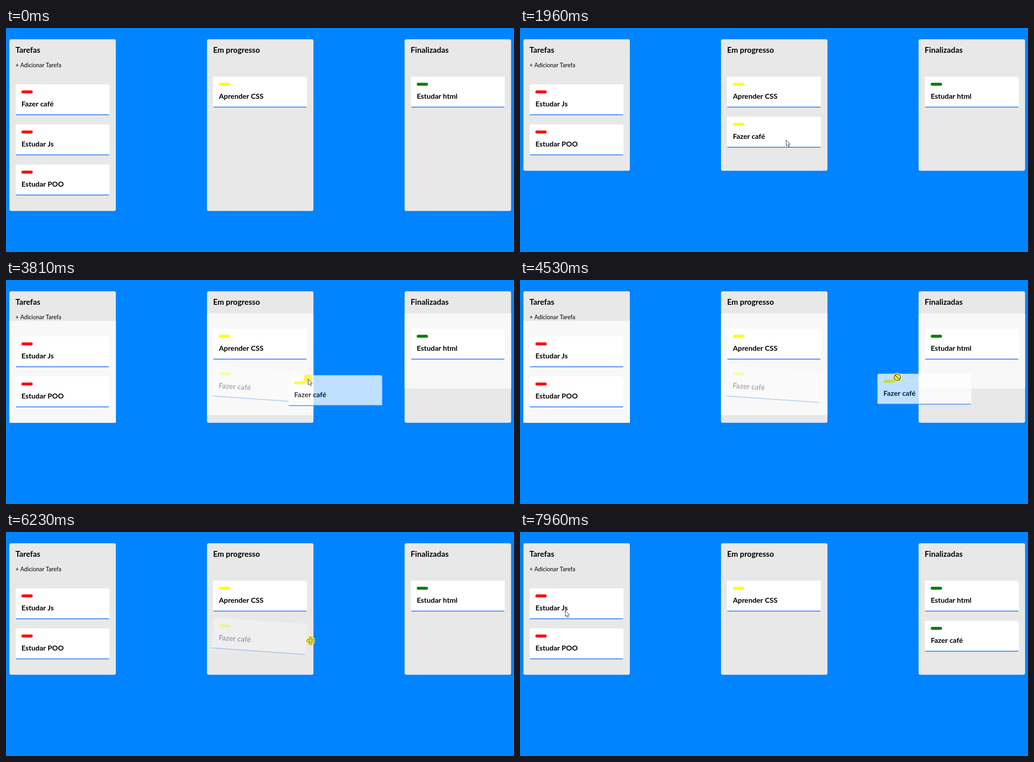
An HTML page with a canvas for the animation above (7.99 s loop, 1127 px wide and 497 px high).

```html
<!DOCTYPE html>
<html lang="pt-BR">
<head>
<meta charset="utf-8">
<title>Quadro de tarefas</title>
<style>
  html, body { margin: 0; width: 100%; height: 100%; overflow: hidden; background: #0084ff; }
  canvas { display: block; }
</style>
</head>
<body>
<canvas id="stage" width="1127" height="497"></canvas>
<script>
const stage = document.getElementById('stage');
const layer = document.createElement('canvas');
layer.width = stage.width;
layer.height = stage.height;
const screen2d = stage.getContext('2d'), layer2d = layer.getContext('2d');
let ctx = screen2d;

const LOOP = 7990;
const FONT = 'Lato, "Open Sans", sans-serif';
const COL_W = 236.2, CARD_W = 208.5, CARD_H = 68.5, PITCH = 89.2;
const MOVED = 'Fazer café';

const columns = ['Tarefas', 'Em progresso', 'Finalizadas'].map((title, i) => ({
  title,
  x: 7.5 + i * 438.4,
  top: i ? 74 : 91,
  color: ['#ff0000', '#ffff00', '#008000'][i]
}));

// When the moved card joins each list
const joinTimes = [0, 1640, 6720];

const drags = [
  { press: 1270, start: 1340, drop: 1960, grip: [159, 41] },
  { press: 3250, start: 3320, drop: 4600, grip: [44, 8] },
  { press: 6150, start: 6260, drop: 6900, grip: [161, 25] }
];

// Pointer strokes; the pointer rests between them
const entry = [1007, 469];
const strokes = [
  { from: 180, to: 610, end: [71, 47] },
  { from: 760, to: 1060, end: [133, 171] },
  { from: 1270, to: 1810, end: [590, 248], bend: -19 },
  { from: 2470, to: 2660, end: [590, 235] },
  { from: 2830, to: 3080, end: [453, 218] },
  { from: 3080, to: 3250, end: [504, 206] },
  { from: 3320, to: 4030, end: [744, 225] },
  { from: 4340, to: 4530, end: [837, 216] },
  { from: 5040, to: 5290, end: [820, 246] },
  { from: 5450, to: 5960, end: [622, 242], bend: 50 },
  { from: 6152, to: 6704, end: [998, 237] },
  { from: 6980, to: 7750, end: [140, 219], bend: 34 },
  { from: 7780, to: 7960, end: [100, 174] }
];

const dragAt = t => drags.find(d => t >= d.press && t < d.drop);

function pointerAt(t) {
  let [x, y] = entry;
  for (const { from, to, end, bend = 0 } of strokes) {
    if (t < from) break;
    const u = Math.min(1, (t - from) / (to - from));
    const e = dragAt(from) ? u : u * u * (3 - 2 * u);
    x += (end[0] - x) * e;
    y += (end[1] - y) * e + bend * Math.sin(Math.PI * u);
  }
  return [x, y];
}

function rect(x, y, w, h, r, fill) {
  ctx.fillStyle = fill;
  ctx.beginPath();
  ctx.roundRect(x, y, w, h, r);
  ctx.fill();
}

function text(str, x, y, size, weight) {
  ctx.font = `${weight} ${size}px ${FONT}`;
  ctx.fillStyle = '#000';
  ctx.fillText(str, x, y);
}

function card(x, y, name, color) {
  rect(x, y, CARD_W, CARD_H, 3.5, '#fff');
  ctx.save();
  ctx.clip();
  rect(x, y + CARD_H - 1.8, CARD_W, 2, 0, '#0a6bf2');
  ctx.restore();
  rect(x + 13.2, y + 13.4, 25, 6.7, 3.35, color);
  text(name, x + 13.2, y + 49, 16, 700);
}

// Paints onto the layer, then blends it as one group
function faded(alpha, paint) {
  ctx = layer2d;
  ctx.clearRect(0, 0, layer.width, layer.height);
  ctx.save();
  paint();
  ctx.restore();
  ctx = screen2d;
  ctx.globalAlpha = alpha;
  ctx.drawImage(layer, 0, 0);
  ctx.globalAlpha = 1;
}

function tiltedCard(x, y, name, color) {
  faded(0.3, () => {
    ctx.translate(x + CARD_W / 2, y + CARD_H / 2);
    ctx.rotate(4 * Math.PI / 180);
    card(-CARD_W / 2, -CARD_H / 2, name, color);
  });
}

function listsAt(t, home) {
  const lists = [['Estudar Js', 'Estudar POO'], ['Aprender CSS'], ['Estudar html']];
  if (t < drags[0].start) lists[0].unshift(MOVED);
  else lists[home].push(MOVED);
  return lists;
}

const homeAt = t => joinTimes.filter(at => t >= at).length - 1;
const zoneHeight = n => Math.max(167, 68 + CARD_H + (n - 1) * PITCH);

function shape(points, fill, stroke) {
  ctx.beginPath();
  points.forEach(p => ctx.lineTo(p[0], p[1]));
  ctx.closePath();
  ctx.fillStyle = fill;
  ctx.fill();
  ctx.strokeStyle = stroke;
  ctx.lineWidth = 1;
  ctx.stroke();
}

function arrow() {
  shape([[0.5, 0.5], [0.5, 13.5], [3.5, 11], [5.5, 15.5], [7.7, 14.6], [5.8, 10.2], [9.5, 10]],
    '#fff', '#303030');
}

function moveIcon() {
  const arm = [[-1.5, -1.5], [-1.5, -5.5], [-3.8, -5.5], [0, -9.5], [3.8, -5.5], [1.5, -5.5]];
  const points = [];
  for (let q = 0; q < 4; q++) {
    const c = Math.round(Math.cos(q * Math.PI / 2)), s = Math.round(Math.sin(q * Math.PI / 2));
    arm.forEach(([x, y]) => points.push([x * c - y * s, x * s + y * c]));
  }
  shape(points, '#f4ec70', '#66621a');
}

function noDropIcon() {
  ctx.strokeStyle = '#5f5c10';
  ctx.lineWidth = 1.6;
  ctx.beginPath();
  ctx.arc(0, 0, 7, 0, 7);
  ctx.moveTo(-5, -5);
  ctx.lineTo(5, 5);
  ctx.stroke();
}

function pointer(x, y, icon, pressed) {
  ctx.save();
  ctx.translate(x, y);
  if (pressed) {
    ctx.fillStyle = 'rgba(255, 242, 60, 0.88)';
    ctx.beginPath();
    ctx.arc(0, 0, 10, 0, 7);
    ctx.fill();
  }
  icon();
  ctx.restore();
}

function draw(t) {
  const home = homeAt(t);
  const lists = listsAt(t, home);
  const drag = dragAt(t);
  const dragging = drag && t >= drag.start;
  const [px, py] = pointerAt(t);
  const bottom = columns[0].top + zoneHeight(lists[0].length);
  let overZone = false;

  rect(0, 0, stage.width, stage.height, 0, '#0084ff');
  columns.forEach((col, i) => {
    const list = lists[i], h = zoneHeight(list.length);
    rect(col.x, 25, COL_W, bottom - 25, 4, '#e8e8e8');
    if (dragging) rect(col.x, col.top, COL_W, h, 0, '#f8f8f8');
    if (px > col.x && px < col.x + COL_W && py > col.top && py < col.top + h) overZone = true;
    text(col.title, col.x + 13.5, 55, 17.3, 700);
    if (!i) text('+ Adicionar Tarefa', col.x + 13.5, 87, 12.8, 400);
    list.forEach((name, n) => {
      const paint = drag && name === MOVED ? tiltedCard : card;
      paint(Math.round(col.x + 13.5), Math.floor(col.top + 34.3 + n * PITCH), name, col.color);
    });
  });

  if (dragging) {
    const color = columns[homeAt(drag.press)].color;
    faded(0.75, () => card(px - drag.grip[0], py - drag.grip[1], MOVED, color));
  }
  if (t >= strokes[0].from) {
    const icon = !drag ? arrow : !dragging ? moveIcon : overZone ? arrow : noDropIcon;
    pointer(px, py, icon, !!drag);
  }
}

const begin = performance.now();
function tick() {
  draw((performance.now() - begin) % LOOP);
  requestAnimationFrame(tick);
}
tick();
</script>
</body>
</html>
```
